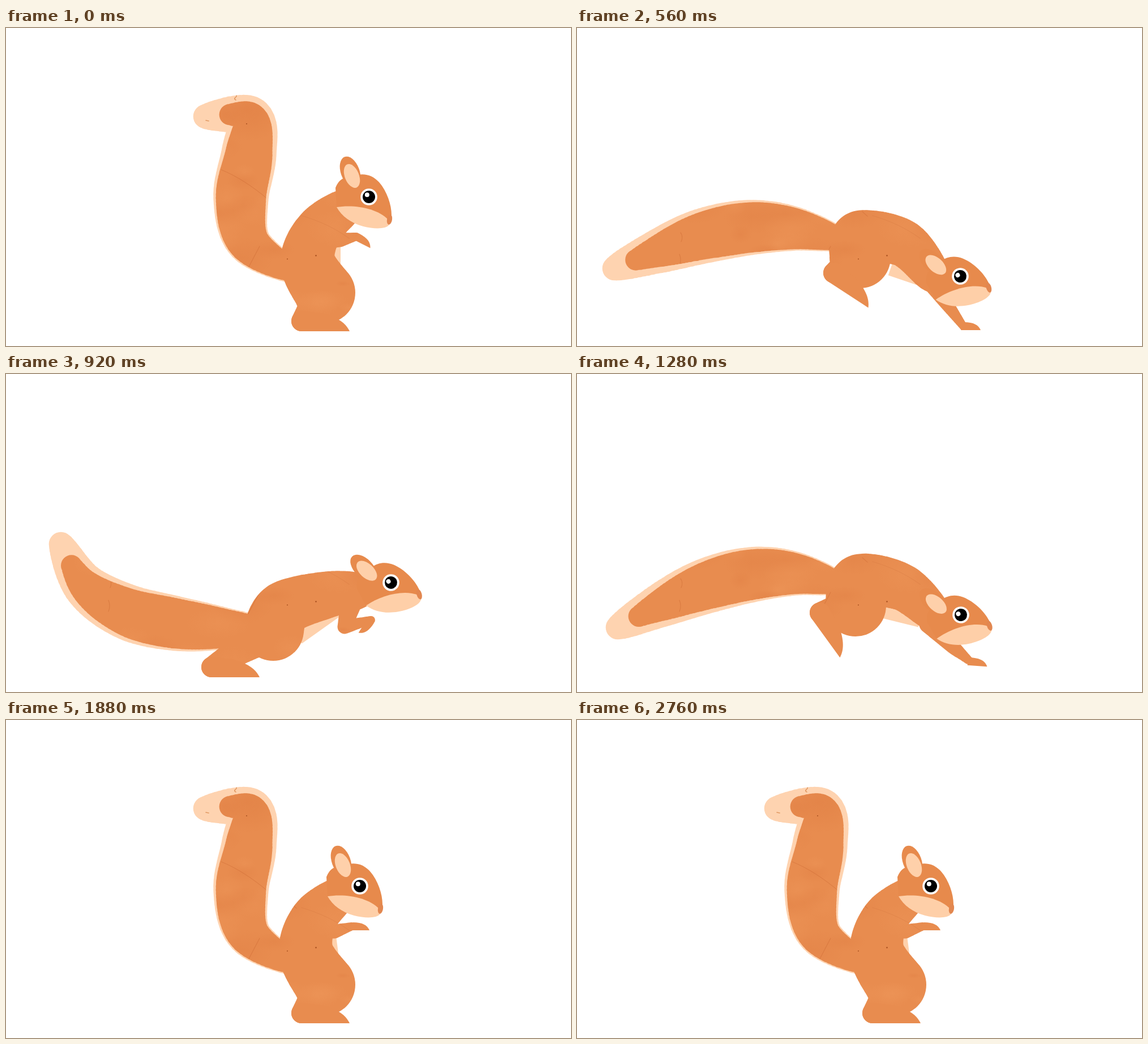
These frames come from a looping animation (998x561 px, 3.48 s). An HTML page:

```html
<!DOCTYPE html>
<html lang="en">
<head>
<meta charset="utf-8">
<title>Squirrel</title>
<style>
  html, body { margin: 0; width: 100%; height: 100%; overflow: hidden; background: #fff; }
  svg { display: block; width: 100%; height: 100%; }
</style>
</head>
<body>
<svg viewBox="0 0 998 561" xmlns="http://www.w3.org/2000/svg">
  <defs>
    <radialGradient id="dark">
      <stop offset="0" stop-color="#d9733a" stop-opacity=".34"/>
      <stop offset="1" stop-color="#d9733a" stop-opacity="0"/>
    </radialGradient>
    <radialGradient id="pale">
      <stop offset="0" stop-color="#f29d60" stop-opacity=".4"/>
      <stop offset="1" stop-color="#f29d60" stop-opacity="0"/>
    </radialGradient>
    <pattern id="fur" width="998" height="561" patternUnits="userSpaceOnUse">
      <rect width="998" height="561" fill="#e88c4f"/>
      <g id="blots"></g>
      <ellipse cx="425" cy="145" rx="75" ry="55" fill="url(#dark)"/>
      <g fill="none" stroke="#c4622c" stroke-opacity=".35" stroke-width="1.3" stroke-linecap="round">
        <path d="M380,250Q420,266 465,304M183,361q5,7 1,16M181,399q4,10 0,20M504,324l9,8M428,423L448,385"/>
        <path d="M522,331Q570,345 606,371" stroke-opacity=".2"/>
      </g>
      <g fill="#a8501f">
        <circle cx="547.5" cy="401.5" r="1.3"/><circle cx="497" cy="407.5" r="1"/>
        <circle cx="425" cy="169" r="1"/>
      </g>
    </pattern>
    <pattern id="cream" width="998" height="561" patternUnits="userSpaceOnUse">
      <rect width="998" height="561" fill="#fed3b0"/>
      <path d="M404,116q6,3 1,7q-3,2 1,4M353,163l5,1M158,314l5,6" fill="none"
        stroke="#d98a4e" stroke-width="1.6" stroke-linecap="round" stroke-opacity=".8"/>
    </pattern>
  </defs>
  <g id="tailGroup">
    <path id="tail" fill="url(#cream)"/>
    <path id="stripe" fill="url(#fur)"/>
  </g>
  <path id="belly" fill="none" stroke="#fed1ac" stroke-width="26"/>
  <path id="body" fill="url(#fur)"/>
  <path id="foot" fill="#e88c4f" d="M0,18L85,18C79,5 66,-6 37,-14L0,-18A18,18 0 0 0 0,18Z"/>
  <path id="arm" fill="url(#fur)"/>
  <path id="paw" fill="#e88c4f" d="M-4,7L31,7C27,-2 19,-7 2,-7Z"/>
  <g id="head">
    <ellipse cx="-33" cy="-44" rx="16.5" ry="28.5" transform="rotate(-20 -33 -44)" fill="#e78a4c"/>
    <path d="M-57,18L-59,-16C-56,-24 -51,-31 -44,-33L-20,-39C-5,-42 8,-37 18,-26C32,-10 40,14 40,32L35,43C20,26 -15,14 -57,18Z" fill="#e78a4c"/>
    <path d="M-57,18C-25,13 15,20 34,40L36,49C30,57 10,57 -10,52C-32,46 -48,34 -57,18Z" fill="#fecfa8"/>
    <ellipse cx="36.5" cy="40" rx="4.5" ry="9" transform="rotate(10 36.5 40)" fill="#e28750"/>
    <ellipse cx="-30" cy="-37" rx="12.5" ry="22" transform="rotate(-22 -30 -37)" fill="#fed0aa"/>
    <circle r="14.8" fill="#fff"/>
    <circle r="11" fill="#000"/>
    <circle cx="-3.2" cy="-3.8" r="4" fill="#fff"/>
  </g>
</svg>
<script>
const LOOP = 3480, STEP = 40;
const $ = id => document.getElementById(id);
const clamp = (v, a, b) => Math.min(b, Math.max(a, v));

// tail: spine from base to tip; body: neck, chest, hip, thigh; belly: a line;
// arm: shoulder, elbow, wrist, paw angle; foot and head: place and angle.
const sit = {
  tail: [498, 427, 428, 377, 415, 300, 429, 222, 429, 158, 352, 156],
  body: [588, 308, 544, 350, 530, 410, 563, 467],
  belly: [569, 374, 576, 428],
  arm: [550, 368, 580, 373, 611, 364, 0],
  foot: [522, 517, 0],
  head: [625, 293, 0]
};
const lean = {
  ...sit,
  body: [602, 313, 553, 355, 533, 412, 563, 467],
  belly: [578, 374, 578, 428],
  arm: [560, 372, 590, 374, 619, 368, 27],
  head: [641, 298, 0]
};
const reach = {
  tail: [458, 371, 383, 354, 305, 352, 222, 367, 143, 394, 66, 424],
  body: [630, 438, 577, 380, 502, 370, 500, 405],
  belly: [554, 424, 604, 441],
  arm: [625, 445, 650, 482, 682, 526, 0],
  foot: [453, 432, 33],
  head: [677, 438, -26]
};
const push = {
  tail: [455, 452, 374, 448, 293, 439, 212, 419, 139, 373, 97, 300],
  body: [625, 382, 565, 390, 492, 413, 472, 452],
  belly: [515, 465, 584, 416],
  arm: [608, 410, 598, 446, 645, 434, 122],
  foot: [363, 517, 0],
  head: [680, 368, -25]
};
const glide = {
  tail: [455, 367, 383, 352, 308, 354, 228, 374, 148, 408, 72, 447],
  body: [632, 425, 574, 376, 500, 366, 492, 409],
  belly: [537, 417, 606, 434],
  arm: [622, 440, 665, 482, 694, 507, 4],
  foot: [429, 421, 54],
  head: [678, 425, -27]
};
const land = {
  tail: [490, 428, 412, 372, 352, 312, 285, 265, 212, 257, 167, 315],
  body: [622, 387, 565, 381, 513, 415, 540, 448],
  belly: [570, 425, 570, 450],
  arm: [575, 425, 570, 450, 592, 455, 0],
  foot: [533, 522, 0],
  head: [690, 393, 1]
};
const leap = {
  ...mix(push, glide, .45),
  tail: [440, 408, 362, 394, 282, 388, 204, 381, 130, 374, 58, 370],
  arm: [615, 425, 650, 450, 688, 460, 10],
  foot: [383, 484, 52],
  head: [688, 382, -27]
};
const plant = { arm: [612, 435, 618, 482, 640, 526, 0] };
const gather = { ...land, tail: null, head: [683, 400, -14] };

const keys = [
  [0, lean], [190, { ...push, tail: land.tail }], [360, leap], [560, reach],
  [660, plant], [790, gather], [920, push], [1070, leap], [1280, glide],
  [1410, plant], [1560, land], [1680, mix(land, sit, .68)], [1880, sit]
];
const tracks = {};
for (const k in sit) tracks[k] = keys.filter(([, p]) => p[k]).map(([t, p]) => [t, p[k]]);

function mix(a, b, f) {
  const out = {};
  for (const k in a) out[k] = a[k].map((v, i) => v + (b[k][i] - v) * f);
  return out;
}

// Hermite in time; the speed is zero at turning points and at both ends.
function sample(track, t) {
  const last = track.length - 1;
  if (t >= track[last][0]) return track[last][1];
  let n = 0;
  while (track[n + 1][0] <= t) n++;
  const [t0, a] = track[n], [t1, b] = track[n + 1];
  const span = t1 - t0, u = (t - t0) / span, u2 = u * u, u3 = u2 * u;
  const speed = (k, i) => {
    if (k === 0 || k === last) return 0;
    const [tp, p] = track[k - 1], [, c] = track[k], [tn, q] = track[k + 1];
    return (c[i] - p[i]) * (q[i] - c[i]) <= 0 ? 0 : (q[i] - p[i]) / (tn - tp);
  };
  return a.map((v, i) =>
    v * (2 * u3 - 3 * u2 + 1) + b[i] * (3 * u2 - 2 * u3) +
    span * (speed(n, i) * (u3 - 2 * u2 + u) + speed(n + 1, i) * (u3 - u2)));
}

// Point at u on a spine of x, y pairs; bend 0 gives straight joints.
function along(v, u, bend) {
  const n = v.length / 2 - 1, i = Math.min(n - 1, Math.floor(u * n)), f = u * n - i;
  return [0, 1].map(c => {
    const at = k => v[clamp(k, 0, n) * 2 + c];
    const a = at(i), b = at(i + 1), m = (b - at(i - 1)) * bend, w = (at(i + 2) - a) * bend;
    if (!bend) return a + (b - a) * f;
    return a + f * (m + f * (3 * (b - a) - 2 * m - w + f * (2 * (a - b) + m + w)));
  });
}

// A limb: circles strung closely along a spine.
function limb(v, radius, bend = .5, end = 1) {
  let d = '';
  for (let i = 0; i <= 60; i++) {
    const u = end * i / 60, r = radius(u), [x, y] = along(v, u, bend);
    d += `M${(x - r).toFixed(1)},${y.toFixed(1)}a${r},${r} 0 1 1 ${2 * r},0a${r},${r} 0 1 1 ${-2 * r},0`;
  }
  return d;
}
const tailWidth = u => 50 * Math.sin(Math.PI * (.14 + .72 * u));
const stripeWidth = u => tailWidth(u) - 2 - 14 * u * u;
const bodyWidth = u => 28 + 26 * u ** .6;
const shinWidth = u => 34 - 16 * u;
const armWidth = u => 18 - 11 * u;

function paintFur() {
  let seed = 11, out = '';
  const rnd = () => (seed = seed * 16807 % 2147483647) / 2147483647;
  for (let i = 0; i < 90; i++) {
    const r = 14 + rnd() * 45;
    out += `<ellipse cx="${rnd() * 760 | 0}" cy="${100 + rnd() * 450 | 0}" rx="${r | 0}" ry="${r * (.4 + rnd() * .5) | 0}" fill="url(#${i % 2 ? 'dark' : 'pale'})" opacity=".6"/>`;
  }
  $('blots').innerHTML = out;
}

const shape = (id, d) => $(id).setAttribute('d', d);
const place = (id, x, y, a) => $(id).setAttribute('transform', `translate(${x} ${y}) rotate(${a})`);

function draw(ms) {
  const t = Math.floor(ms % LOOP / STEP) * STEP;
  const p = {};
  for (const k in tracks) p[k] = sample(tracks[k], t);
  const flick = Math.sin(Math.PI * clamp((t - 2240) / 520, 0, 1)) ** 2;

  shape('tail', limb(p.tail, tailWidth));
  shape('stripe', limb(p.tail, stripeWidth, .5, .89));
  $('tailGroup').setAttribute('transform', `rotate(${-10 * flick} 485 430)`);

  const shin = [...p.body.slice(6), p.foot[0], p.foot[1]];
  shape('body', limb(p.body, bodyWidth) + limb(shin, shinWidth, 0));
  shape('belly', `M${p.belly[0]},${p.belly[1]}L${p.belly[2]},${p.belly[3]}`);
  shape('arm', limb(p.arm.slice(0, 6), armWidth, 0));
  place('paw', ...p.arm.slice(4));
  place('foot', ...p.foot);
  place('head', p.head[0] - 3 * flick, p.head[1] + 2 * flick, p.head[2]);
}

paintFur();
const begin = performance.now();
function tick() {
  draw(performance.now() - begin);
  requestAnimationFrame(tick);
}
tick();
</script>
</body>
</html>
```
